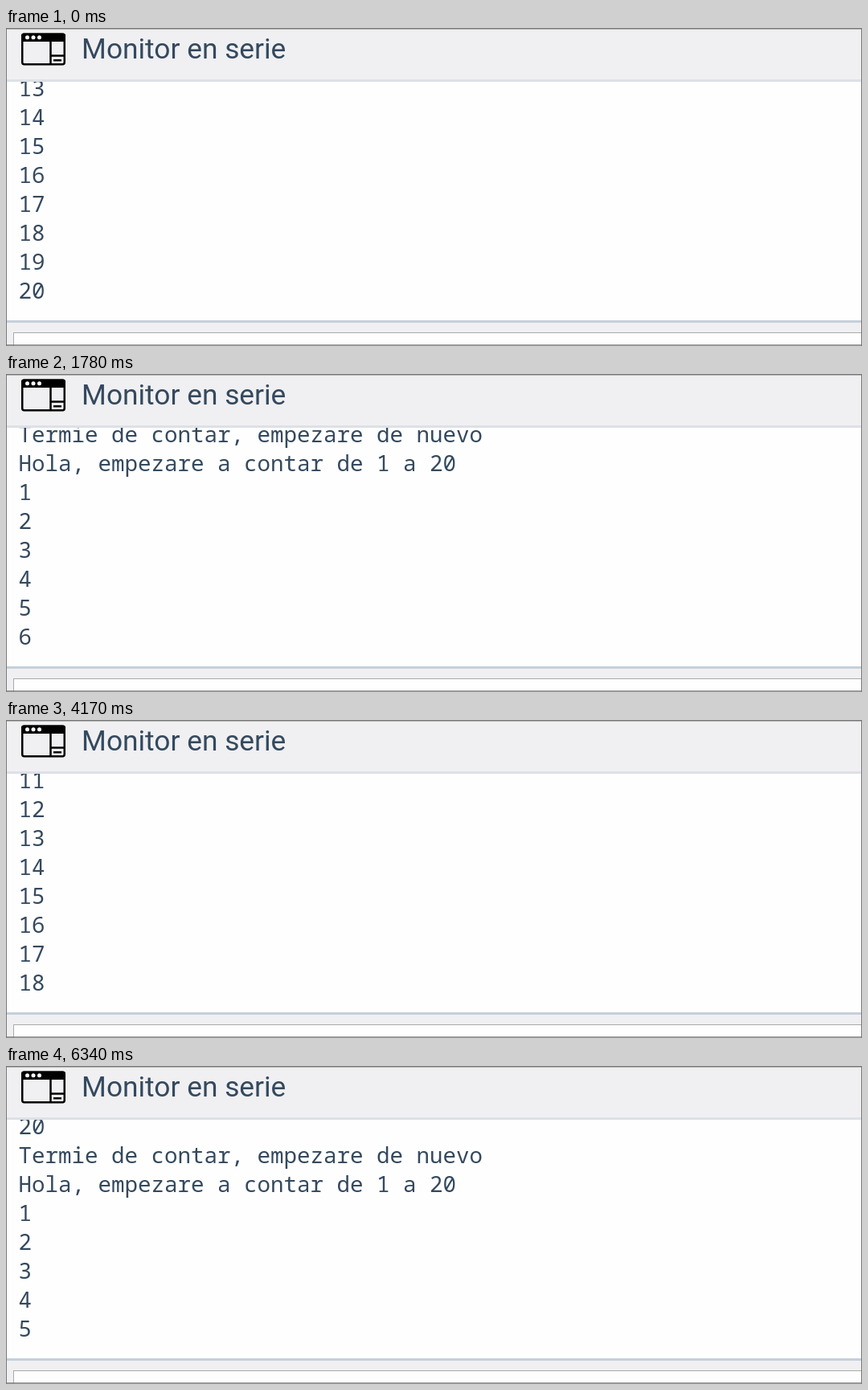
Animation, 1065 px wide and 396 px high, one loop 6440 ms. Source, as an HTML page:

```html
<!DOCTYPE html>
<html lang="es">
<head>
<meta charset="utf-8">
<title>Monitor en serie</title>
<style>
  html, body { margin: 0; width: 100%; height: 100%; overflow: hidden; background: #fefefe; }
  svg { display: block; width: 1065px; height: 396px; }
  text { fill: #34495e; white-space: pre; }
  .title { font: 35.3px Roboto, sans-serif; }
  .log { font: 27.5px "Noto Sans Mono", monospace; }
</style>
</head>
<body>
<svg viewBox="0 0 1065 396">
  <defs><clipPath id="pane"><rect x="1" y="67" width="1063" height="297"/></clipPath></defs>
  <rect width="1065" height="396" fill="#fefefe"/>
  <g class="log" id="log" clip-path="url(#pane)"></g>

  <rect width="1065" height="65" fill="#f0f0f2"/>
  <rect y="64" width="1065" height="3" fill="#dde1e6"/>
  <g id="icon">
    <rect x="20.25" y="7.75" width="52.5" height="37.5" rx="2.5" fill="none" stroke="#000" stroke-width="2.5"/>
    <path d="M19 17V9.500Q19 6.500 22 6.500H71Q74 6.500 74 9.500V17Z"/>
    <path d="M55.500 16V45M55.500 34.500H73" fill="none" stroke="#000" stroke-width="2.500"/>
    <path d="M59 40.200H69" stroke="#000" stroke-width="2.500"/>
    <g fill="#fff">
      <circle cx="26.500" cy="11.700" r="2.500"/>
      <circle cx="34" cy="11.700" r="2.500"/>
      <circle cx="41.500" cy="11.700" r="2.500"/>
    </g>
  </g>
  <text class="title" x="94.1" y="38">Monitor en serie</text>

  <rect y="364" width="1065" height="32" fill="#f0f0f2"/>
  <rect y="364" width="1065" height="3" fill="#c5cfdb"/>
  <rect x="9.5" y="379.5" width="1070" height="30" fill="#fefefe" stroke="#a9a9a9"/>
  <path d="M0 .75H1065M0 395H1065" stroke="#777" stroke-width="1.5"/>
  <path d="M.5 0V396M1064.500 0V396" stroke="#777"/>
</svg>
<script>
  const LOOP = 6440, ROWS = 8, ROW_H = 36, BASE = 337;
  const DONE = "Termie de contar, empezare de nuevo";
  const HELLO = "Hola, empezare a contar de 1 a 20";

  const count = (from, to) => Array.from({ length: to - from + 1 }, (_, i) => String(from + i));
  const lines = [...count(13, 20), DONE, HELLO, ...count(1, 20), DONE, HELLO, ...count(1, 5)];

  // Moments at which the log receives text; both "DONE" lines arrive in two pieces.
  const ticks = [
    150, 430, 690, 830, 1110, 1260, 1400, 1650, 1780, 2060, 2200, 2460, 2610,
    2880, 3030, 3190, 3460, 3580, 3860, 4010, 4170, 4480, 4620,
    4900, 5160, 5410, 5550, 5690, 5940, 6090, 6340
  ];
  const states = [{ last: ROWS - 1, cut: false }];
  for (let last = ROWS; last < lines.length; last++) {
    if (lines[last] === DONE) states.push({ last, cut: true });
    states.push({ last, cut: false });
  }

  const log = document.getElementById("log");
  const rows = Array.from({ length: ROWS }, (_, i) => {
    const row = document.createElementNS("http://www.w3.org/2000/svg", "text");
    row.setAttribute("x", 15.5);
    row.setAttribute("y", BASE - (ROWS - 1 - i) * ROW_H);
    return log.appendChild(row);
  });

  let shown = -1;
  function draw(now) {
    const t = now % LOOP;
    const step = ticks.filter(at => at <= t).length;
    if (step !== shown) {
      shown = step;
      const { last, cut } = states[step];
      rows.forEach((row, i) => {
        const n = last - ROWS + 1 + i;
        row.textContent = cut && n === last ? lines[n].slice(0, 6) : lines[n];
      });
    }
  }

  const start = performance.now();
  function frame() {
    draw(performance.now() - start);
    requestAnimationFrame(frame);
  }
  frame();
</script>
</body>
</html>
```
